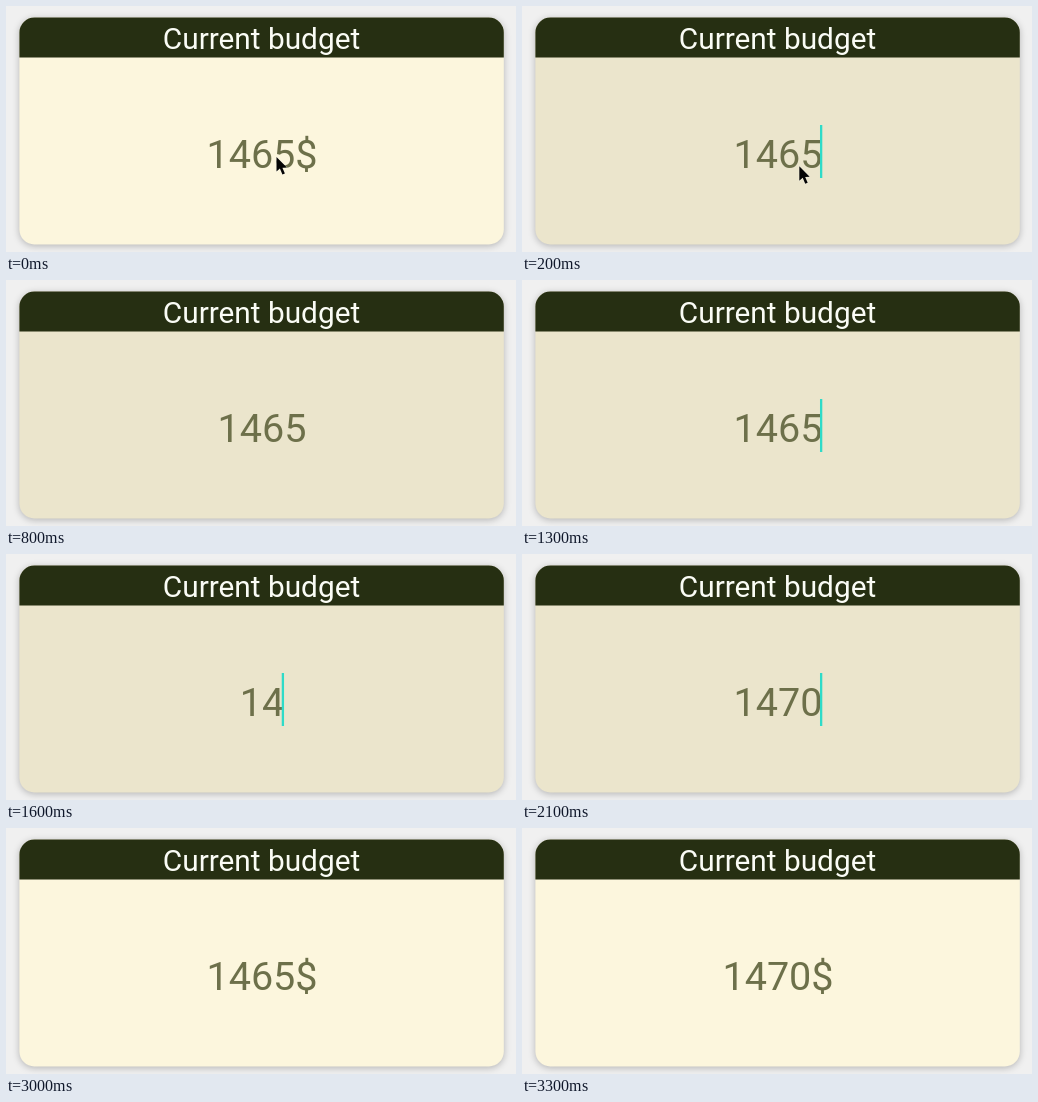
Write an HTML page with a canvas that moves like this. It is 510 px wide and 246 px high and loops after 3.5 s.

```html
<!DOCTYPE html>
<html lang="en">
<head>
<meta charset="utf-8">
<title>Current budget</title>
<style>
html, body { margin: 0; width: 100%; height: 100%; overflow: hidden; background: #f0f0f0; }
canvas { display: block; width: 510px; height: 246px; filter: blur(.4px); }
</style>
</head>
<body>
<canvas id="stage" width="510" height="246"></canvas>
<script>
const ctx = document.getElementById('stage').getContext('2d');
const LOOP = 3500, STEP = 100, MID = 256;
const OLD = '1465', NEW = '1470', KEPT = 2;
const EDIT = 200, ERASE = 1400, TYPE = 1900, TYPED = 2000, SAVE = 3000, UPDATE = 3100;
const POINTER_GONE = 600;
const arrow = new Path2D('M0 0V14.6L3.4 11.6L5.9 17.5L8.4 16.4L5.9 10.8L10.4 10.5Z');

// Keys pressed by time t, one per step from start.
const keys = (t, start) => Math.min(2, Math.max(0, (t - start) / STEP + 1));

function fieldText(t) {
  const left = OLD.slice(0, OLD.length - keys(t, ERASE));
  return left + NEW.slice(KEPT, KEPT + keys(t, TYPE));
}

// The blink restarts with each key press.
function caretOn(t) {
  const since = t < ERASE ? EDIT + STEP : Math.min(t, TYPED);
  return (t - since) % 1000 < 500;
}

function text(str, x, y, size, color) {
  ctx.font = `400 ${size}px Roboto, sans-serif`;
  ctx.textAlign = 'center';
  ctx.fillStyle = color;
  ctx.fillText(str, x, y);
  return ctx.measureText(str).width;
}

function card(color) {
  ctx.save();
  ctx.beginPath();
  ctx.roundRect(13.4, 11.5, 484.4, 227, 15);
  ctx.shadowColor = 'rgba(0, 0, 0, .25)';
  ctx.shadowBlur = 7;
  ctx.shadowOffsetY = 1.5;
  ctx.fillStyle = color;
  ctx.fill();
  ctx.shadowColor = 'transparent';
  ctx.clip();
  ctx.fillStyle = '#262f12';
  ctx.fillRect(13, 11, 486, 40.5);
  ctx.restore();
}

function pointer(t) {
  const p = (t / 300) ** 1.5;
  ctx.save();
  ctx.translate(270.5 + 12.5 * p, 151 + 17 * p);
  ctx.lineWidth = 1;
  ctx.strokeStyle = 'rgba(255, 255, 245, .6)';
  ctx.stroke(arrow);
  ctx.fillStyle = '#050505';
  ctx.fill(arrow);
  ctx.restore();
}

function draw(now) {
  const t = Math.floor(now % LOOP / STEP) * STEP;
  const editing = t >= EDIT && t < SAVE;
  const amount = editing ? fieldText(t) : (t < UPDATE ? OLD : NEW) + '$';

  ctx.fillStyle = '#f0f0f0';
  ctx.fillRect(0, 0, 510, 246);
  card(editing ? '#ebe5cc' : '#fcf6dd');
  text('Current budget', MID - 0.5, 43.4, 29.8, '#fafcf5');
  const width = text(amount, MID, 161.8, 39.6, '#6d704a');

  if (editing && caretOn(t)) {
    ctx.fillStyle = '#2fdbc8';
    ctx.fillRect(MID + width / 2 - 2.5, 119, 2.3, 53);
  }
  if (t < POINTER_GONE) pointer(t);
}

const start = performance.now();
function tick() {
  draw(performance.now() - start);
  requestAnimationFrame(tick);
}
tick();
</script>
</body>
</html>
```
